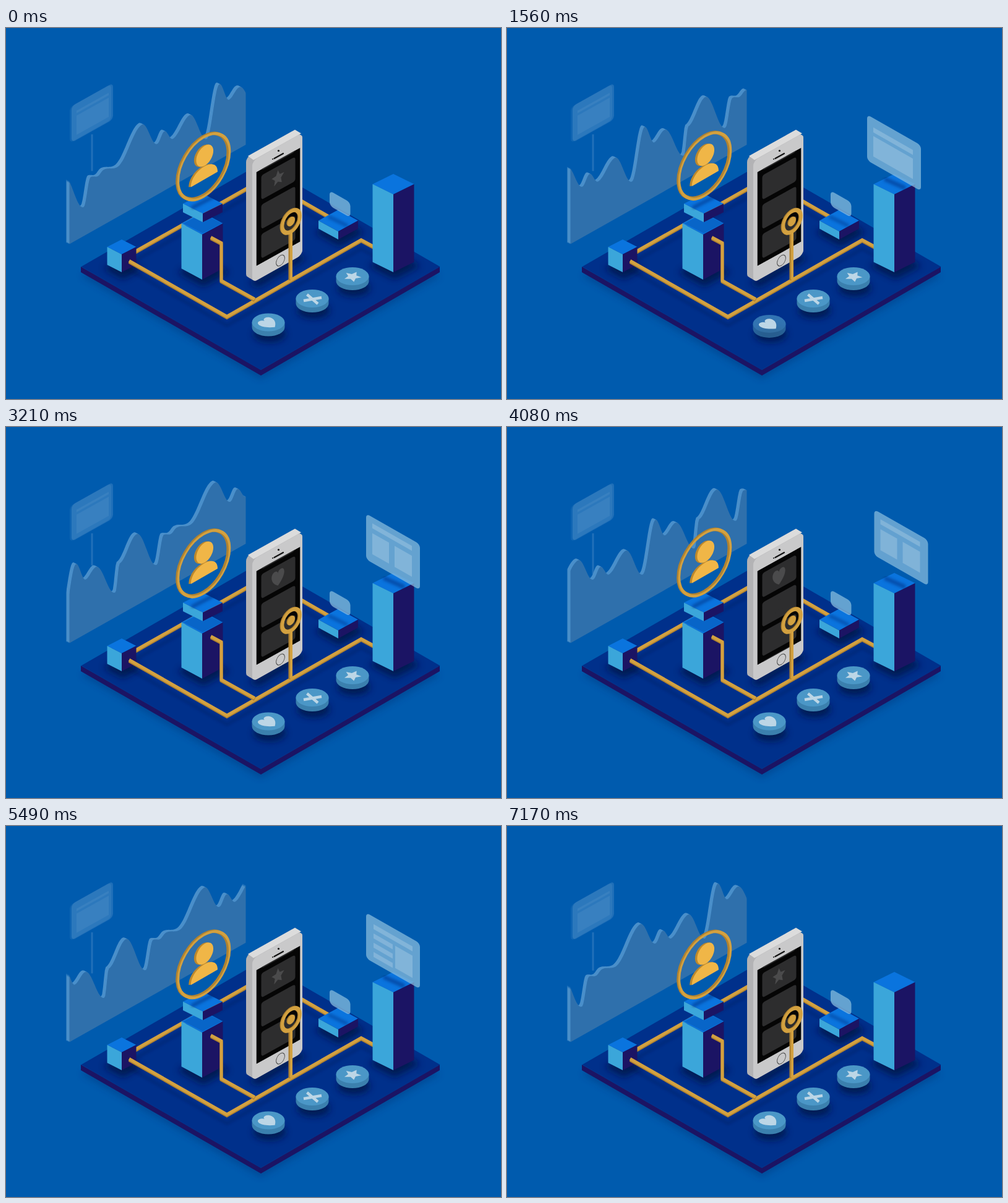
Animation, 800 px wide and 600 px high, one loop 7200 ms. Source, as an HTML page:

```html
<!DOCTYPE html>
<html lang="en">
<head>
<meta charset="utf-8">
<title>Isometric app scene</title>
<style>
html, body { margin: 0; width: 100%; height: 100%; overflow: hidden; background: #005bae; }
svg { display: block; width: 800px; height: 600px; }
</style>
</head>
<body>
<svg id="stage" viewBox="0 0 800 600"></svg>
<script>
const LOOP = 7200, PERIOD = 350, SLOPE = .564, PITCH = 47.5;
const GOLD = '#d3a140', SHADE = '#b08230', NIGHT = '#001648';

const clamp = v => Math.max(0, Math.min(1, v));
const ease = p => p < .5 ? 2 * p * p : 1 - 2 * (1 - p) ** 2;
const range = (n, f) => Array.from({ length: n }, (_, i) => f(i)).join('');

// Peaks and dips of the chart, joined by cosine easing and repeated every period.
const turns = [[90, 115], [123, 47], [134, 89], [146, 84], [155, 89], [177, 81], [217, 127], [242, 82],
  [253, 96], [267, 76], [294, 99], [322, 45], [342, 122], [358, 88], [374, 99], [406, 40], [413, 83], [440, 115]];

function chartHeight(x) {
  const u = 90 + ((x - 90) % PERIOD + PERIOD) % PERIOD;
  const i = turns.findIndex(p => p[0] > u);
  const [x0, h0] = turns[i - 1], [x1, h1] = turns[i];
  return h0 + (h1 - h0) * (1 - Math.cos(Math.PI * (u - x0) / (x1 - x0))) / 2;
}

function chartPath() {
  let d = 'M-300,0';
  for (let x = -300; x <= 450; x += 1.5) d += `L${x},${-chartHeight(x).toFixed(1)}`;
  return d + 'V0Z';
}

const poly = (pts, fill) => `<polygon points="${pts}" fill="${fill}"/>`;
const rect = (x, y, w, h, fill, r = 0) =>
  `<rect x="${x}" y="${y}" width="${w}" height="${h}" rx="${r}" fill="${fill}"/>`;
const group = (transform, body, extra = '') => `<g transform="${transform}" ${extra}>${body}</g>`;
const skew = (x, y, slope, body) => group(`matrix(1 ${slope} 0 1 ${x} ${y})`, body);
const upright = (x, y, body) => group(`matrix(.866 -.5 0 1 ${x} ${y})`, body);
const line = (d, color, width) =>
  `<path d="${d}" fill="none" stroke="${color}" stroke-width="${width}"/>`;
const pipe = d => group('translate(0 2.5)', line(d, SHADE, 5)) + group('translate(0 .5)', line(d, GOLD, 5));
const ring = (r, w, color) => `<circle r="${r}" fill="none" stroke="${color}" stroke-width="${w}"/>`;
const blurred = (blur, opacity, body, id = '') =>
  `<g id="${id}" filter="url(#blur${blur})" opacity="${opacity}">${body}</g>`;

// Boxes are given by front top corner, half width, half depth and height.
const diamond = (x, y, w, d, fill) => poly([x - w, y - d, x, y - 2 * d, x + w, y - d, x, y], fill);
const wall = (x, y, w, d, h, fill) => poly([x, y, x + w, y - d, x + w, y + h - d, x, y + h], fill);
const box = ([x, y, w, d, h]) =>
  diamond(x, y, w, d, '#0a74de') + wall(x, y, -w, d, h, '#3ba6da') + wall(x, y, w, d, h, '#1b1464');
const boxShadow = ([x, y, w, d, h]) => diamond(x + 2, y + h + 11, w + 8, d + 5, NIGHT);

const cube = [187, 366, 23.5, 12, 29], midTower = [317, 334, 33.5, 18, 73], floating = [318, 300, 32, 16, 14];
const slab = [537, 329, 32, 17.5, 13], tallTower = [626, 269, 33.5, 16.5, 126];

const star = Array.from({ length: 10 }, (_, i) => {
  const a = (i / 5 - .5) * Math.PI, r = i % 2 ? 6 : 12.5;
  return (i ? 'L' : 'M') + (r * Math.cos(a)).toFixed(2) + ',' + (r * Math.sin(a)).toFixed(2);
}).join('') + 'Z';
const heart = 'M0,14C-17,2 -13,-11 -6,-11C-2,-11 0,-8 0,-6C0,-8 2,-11 6,-11C13,-11 17,2 0,14Z';
const icons = { heart, star, blank: '' };

const ICON = '#bcd6e6';
const flat = (x, y, d) => group(`matrix(.83 -.48 .83 .48 ${x} ${y})`, `<path d="${d}" fill="${ICON}"/>`);
const buttons = [
  { x: 424, y: 476, press: 1200, icon: flat(423, 477, heart) },
  { x: 495, y: 437.5, press: 5950, icon: line('M481,441L510,436M486.500,431L504,446', ICON, 4.5) },
  { x: 560, y: 401.5, press: 3330, icon: flat(560, 402, star) }];
const drawButton = ({ x, y, icon }) => `<g class="button"><g class="body">
  <path d="M${x - 26.5},${y}v8a26.500,14.500 0 0 0 53,0v-8z" fill="#3b80ae"/>
  <ellipse cx="${x}" cy="${y}" rx="26.500" ry="14.500" fill="#4b97c7"/></g>${icon}</g>`;

const PANE = 'rgba(255,255,255,.19)';
const column = (x, y, w, h) => rect(x, y, w, h, PANE);
const layouts = [
  column(10, 13, 64, 8) + column(10, 27, 64, 33),
  column(10, 8, 64, 8) + column(10, 24, 27, 34) + column(46, 24, 28, 34),
  column(12, 10, 63, 8) + range(3, i => column(12, 25 + 15 * i, 31, 8)) + column(47, 25, 28, 36)];
const glass = (w, h) =>
  rect(0, -2, w, h, 'rgba(154,201,229,.65)', 6) + rect(0, 0, w - 3, h - 3, 'rgba(100,160,205,.35)', 6);

const chart = chartPath();
const chartLayer = (i, fill) => group(`translate(${-i} ${-i * .5})`,
  skew(0, 352 + 98 * SLOPE, -SLOPE, `<path class="chart" d="${chart}" fill="${fill}"/>`),
  'clip-path="url(#chartClip)"');

const person = (x, fill) => upright(x, 224.5, `<g fill="${fill}"><circle cx="2" cy="-17" r="16"/>
  <path d="M-24,21C-24,-7 26,-7 26,21Z"/></g>`);
const knob = (x, y, fill) => upright(x, y, ring(16.5, 6, fill) + `<circle r="7" fill="${fill}"/>`);

const backPipe = 'M205,363L416,243.500L535,312';
const frontPipe = 'M199,376L357,466L574,342L598,355';
const veil = 'rgba(255,255,255,.06)';

const phone = range(11, i => skew(388 + i, 209 + i * .6, -.56, rect(0, 0, 81, 197, '#b3b3b5', 8))) +
  poly([391, 207, 467, 164.5, 477, 170.5, 400, 213.5], '#dcdcdc') +
  skew(398, 215, -.56, rect(0, 0, 81, 197, '#c9c9ca', 8)) +
  `<path d="M433.500,211L448,203" stroke="#111" stroke-width="2.200" stroke-linecap="round"/>
  <circle cx="440.500" cy="198.500" r="1.600" fill="#111"/><circle cx="431" cy="212" r="1" fill="#111"/>` +
  upright(443.5, 376, ring(8, 1, '#444')) +
  skew(404.5, 233, -.555, `<g clip-path="url(#screenClip)">${rect(0, 0, 71, 152, '#050505')}<g id="list">` +
    range(5, i => rect(8, 10 + (i - 1) * PITCH, 55, 39.5, '#2d2d2e', 4)) +
    `<path id="oldIcon" transform="translate(35 ${29 - PITCH}) scale(.85 1)" fill="#4b4b4c"/>
    <path id="newIcon" transform="translate(35 29) scale(.85 1)" fill="#4b4b4c"/></g></g>`);

const stage = document.getElementById('stage');
stage.innerHTML = `<defs>
  <clipPath id="chartClip"><rect x="102.500" y="0" width="285" height="420"/></clipPath>
  <clipPath id="screenClip"><rect width="71" height="152"/></clipPath>
  <filter id="blur6" x="-20%" y="-20%" width="140%" height="140%"><feGaussianBlur stdDeviation="6"/></filter>
  <filter id="blur2" x="-20%" y="-20%" width="140%" height="140%"><feGaussianBlur stdDeviation="2"/></filter>
</defs>` +
rect(0, 0, 800, 600, '#005bae') +
skew(103, 128, -.56, rect(0, 0, 67, 58, veil, 6) + rect(3, 0, 67, 59, 'rgba(255,255,255,.12)', 6) +
  rect(11, 12, 52, 4, veil) + rect(11, 20, 52, 31, veil)) +
`<rect id="pole" x="137.500" y="172" width="3" fill="rgba(255,255,255,.13)"/>` +
range(5, i => chartLayer(5 - i, '#4a8fca')) + chartLayer(0, '#2f70ac') +
// board
blurred(6, .35, diamond(411.5, 568, 290, 167, '#002a6c')) +
wall(412, 553, -291, 167, 9, '#1b1464') + wall(412, 553, 289, 167, 9, '#1b1464') +
diamond(411.5, 553, 290, 167, '#00308b') +
blurred(6, .85, [cube, midTower, slab, tallTower].map(boxShadow).join('') +
  poly([392, 412, 470, 366, 486, 372, 408, 419], NIGHT) +
  buttons.map(b => `<ellipse cx="${b.x + 2}" cy="${b.y + 19}" rx="26" ry="13" fill="${NIGHT}"/>`).join('')) +
group('translate(0 15)', blurred(2, .2, line(backPipe + frontPipe, '#001040', 5))) +
pipe(backPipe) + box(cube) + box(midTower) +
diamond(318, 332, 31, 16, 'rgba(0,40,110,.2)') + box(floating) +
blurred(2, .5, line('M300,291L337,272', '#002c7c', 6)) +
box(slab) + blurred(2, .4, line('M521,305L552,320', '#002c7c', 6)) +
skew(523, 265, .57, glass(33.5, 24.5)) +
phone + pipe(frontPipe) + pipe('M331,338L348,347V408L402,438') +
rect(456.5, 328, 3.5, 80, SHADE) + rect(459, 328, 4, 79, GOLD) +
knob(459.5, 312.5, SHADE) + knob(461, 313, GOLD) +
box(tallTower) + blurred(2, 1, line('M610,244L644,259', '#002c7c', 7), 'cardShadow') +
`<g id="ring">` + upright(317.5, 223.5, ring(47.5, 5, SHADE)) + upright(320, 224.5, ring(48, 4, GOLD)) +
range(3, i => person(316 + i, '#bd882c')) + person(319.5, '#f0b647') + '</g>' +
buttons.map(drawButton).join('') +
layouts.map(rows => `<g class="card">${glass(87, 74)}${rows}</g>`).join('');

const el = id => document.getElementById(id);
const all = name => stage.querySelectorAll('.' + name);
const charts = all('chart'), cards = all('card'), caps = all('button'), bodies = all('body');

// Card height above its resting place: a fall and two bounces.
function cardLift(p) {
  const hop = (from, to, h) => 4 * h * (p - from) * (to - p) / (to - from) ** 2;
  if (p < 483) return 262 * (1 - (p / 483) ** 2);
  return p < 790 ? hop(483, 790, 26) : p < 960 ? hop(790, 960, 8) : 0;
}

function drawCards(t) {
  let shade = 0;
  cards.forEach((card, i) => {
    const p = t - i * 2250, shown = p >= 0 && p < 2290;
    card.style.display = shown ? '' : 'none';
    if (!shown) return;
    const out = clamp((p - 1700) / 580), lift = cardLift(p), alpha = 1 - out ** 4;
    card.setAttribute('transform', `matrix(1 .57 0 1 ${582 + 51 * out} ${142 - lift - 29 * out})`);
    card.style.opacity = alpha;
    shade = Math.max(shade, clamp(1 - lift / 200) * alpha * .5);
  });
  el('cardShadow').style.opacity = shade;
}

const scrolls = [[-LOOP, 'heart', 'star'], [100, 'star', 'blank'], [1750, 'blank', 'heart'], [4000, 'heart', 'star']];

function drawScreen(t) {
  const [start, before, after] = scrolls.filter(s => t >= s[0]).pop();
  const e = ease(clamp((t - start) / 600));
  el('list').setAttribute('transform', `translate(0 ${PITCH * (1 - e)})`);
  el('oldIcon').setAttribute('d', icons[before]);
  el('newIcon').setAttribute('d', icons[after]);
  el('newIcon').style.opacity = e;
}

function drawButtons(t) {
  buttons.forEach(({ press }, i) => {
    const s = Math.sin(Math.PI * clamp((t - press) / 600));
    bodies[i].style.opacity = 1 - .35 * s;
    caps[i].setAttribute('transform', `translate(0 ${3 * s ** 4})`);
  });
}

function draw(t) {
  const shift = t / 2400 % 1 * PERIOD + 2.5;
  charts.forEach(c => c.setAttribute('transform', `translate(${shift} 0)`));
  const surface = 350 - 41 * SLOPE - chartHeight(139 - shift);
  el('pole').setAttribute('height', Math.min(surface - 7, 243) - 172);

  const bob = (1 - Math.cos(t / 1800 * 2 * Math.PI)) / 2;
  el('ring').setAttribute('transform', `translate(0 ${-8.7 * bob})`);
  drawCards(t);
  drawScreen(t);
  drawButtons(t);
}

const begin = performance.now();
function tick() {
  draw((performance.now() - begin) % LOOP);
  requestAnimationFrame(tick);
}
tick();
</script>
</body>
</html>
```
